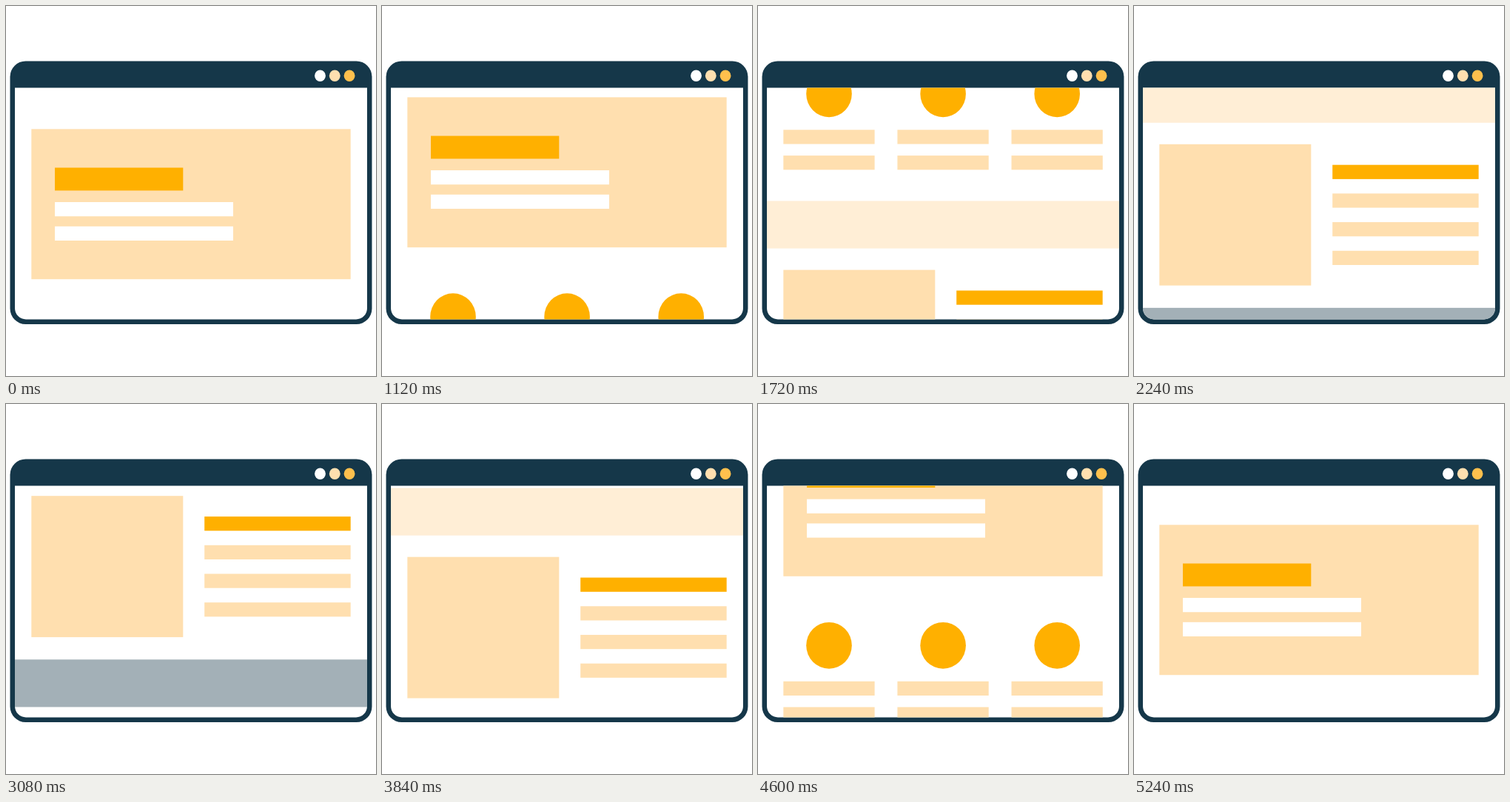
Recreate the animation shown at these times as an HTML page with a canvas. Size 500 by 500 pixels, loop 5280 ms.

```html
<!DOCTYPE html>
<html lang="en">
<head>
<meta charset="utf-8">
<title>Scrolling page</title>
<style>
  html, body { margin: 0; width: 100%; height: 100%; overflow: hidden; background: #fff; }
  canvas { display: block; width: 500px; height: 500px; }
</style>
</head>
<body>
<canvas id="stage"></canvas>
<script>
const LOOP = 5280, STEP = 40, HOLD = 640;
const DEPTH = 577;
const START = 590, TURN = 3203, END = 5374;
const NAVY = '#153749', ORANGE = '#ffb000', AMBER = '#ffc04d',
      CREAM = '#ffdfaf', PALE = '#ffeed6', GREY = '#a3b0b7', WHITE = '#fff';

const canvas = document.getElementById('stage');
const ctx = canvas.getContext('2d');
const scale = window.devicePixelRatio || 1;
canvas.width = canvas.height = 500 * scale;

// Cubic bezier easing with handles (a, 0) and (b, 1).
function ease(x, a, b) {
  let lo = 0, hi = 1;
  for (let i = 0; i < 30; i++) {
    const p = (lo + hi) / 2, q = 1 - p;
    if (3 * a * p * q * q + 3 * b * p * p * q + p * p * p < x) lo = p;
    else hi = p;
  }
  return lo * lo * (3 - 2 * lo);
}

function scrollAt(t) {
  if (t < HOLD) return 0;
  if (t < TURN) return DEPTH * ease((t - START) / (TURN - START), 0.53, 0.198);
  return DEPTH * (1 - ease((t - TURN) / (END - TURN), 0.52, 0.489));
}

function box(x1, y1, x2, y2, color) {
  ctx.fillStyle = color;
  ctx.fillRect(x1, y1, x2 - x1, y2 - y1);
}

function oval(x, y, rx, ry, color) {
  ctx.fillStyle = color;
  ctx.beginPath();
  ctx.ellipse(x, y, rx, ry, 0, 0, Math.PI * 2);
  ctx.fill();
}

function roundBox(x1, y1, x2, y2, radii) {
  ctx.beginPath();
  ctx.roundRect(x1, y1, x2 - x1, y2 - y1, radii);
}

function drawPage() {
  // hero
  box(34.3, 166.3, 465.7, 369.2, CREAM);
  box(66, 218.5, 239.3, 249.4, ORANGE);
  box(66, 265, 307, 284.2, WHITE);
  box(66, 297.8, 307, 317, WHITE);

  // three columns
  for (let i = 0; i < 3; i++) {
    const x = 34.3 + i * 154.1;
    oval(x + 61.7, 462.7, 30.8, 31.4, ORANGE);
    box(x, 511.2, x + 123.3, 530.4, CREAM);
    box(x, 546, x + 123.3, 565.2, CREAM);
  }

  box(0, 607.3, 500, 671.5, PALE);

  // picture and text lines
  box(34.3, 700.5, 239.3, 891.4, CREAM);
  for (let i = 0; i < 4; i++) {
    const y = 728.4 + i * 38.7;
    box(268.2, y, 465.7, y + 19.2, i ? CREAM : ORANGE);
  }

  // footer
  box(0, 921.6, 500, 985.8, GREY);
}

function draw(t) {
  ctx.setTransform(scale, 0, 0, scale, 0, 0);
  box(0, 0, 500, 500, WHITE);

  ctx.fillStyle = NAVY;
  roundBox(5.5, 74.5, 494.5, 430, 21);
  ctx.fill();
  [WHITE, CREAM, AMBER].forEach((c, i) => oval(424.5 + i * 19.8, 94.2, 7.4, 7.8, c));

  ctx.save();
  roundBox(12, 110.5, 488, 423.5, [0, 0, 15, 15]);
  ctx.fillStyle = WHITE;
  ctx.fill();
  ctx.clip();
  ctx.translate(0, -scrollAt(t));
  drawPage();
  ctx.restore();
}

const begin = performance.now();
function tick() {
  const t = (performance.now() - begin) % LOOP;
  draw(Math.floor(t / STEP) * STEP);
  requestAnimationFrame(tick);
}
tick();
</script>
</body>
</html>
```
